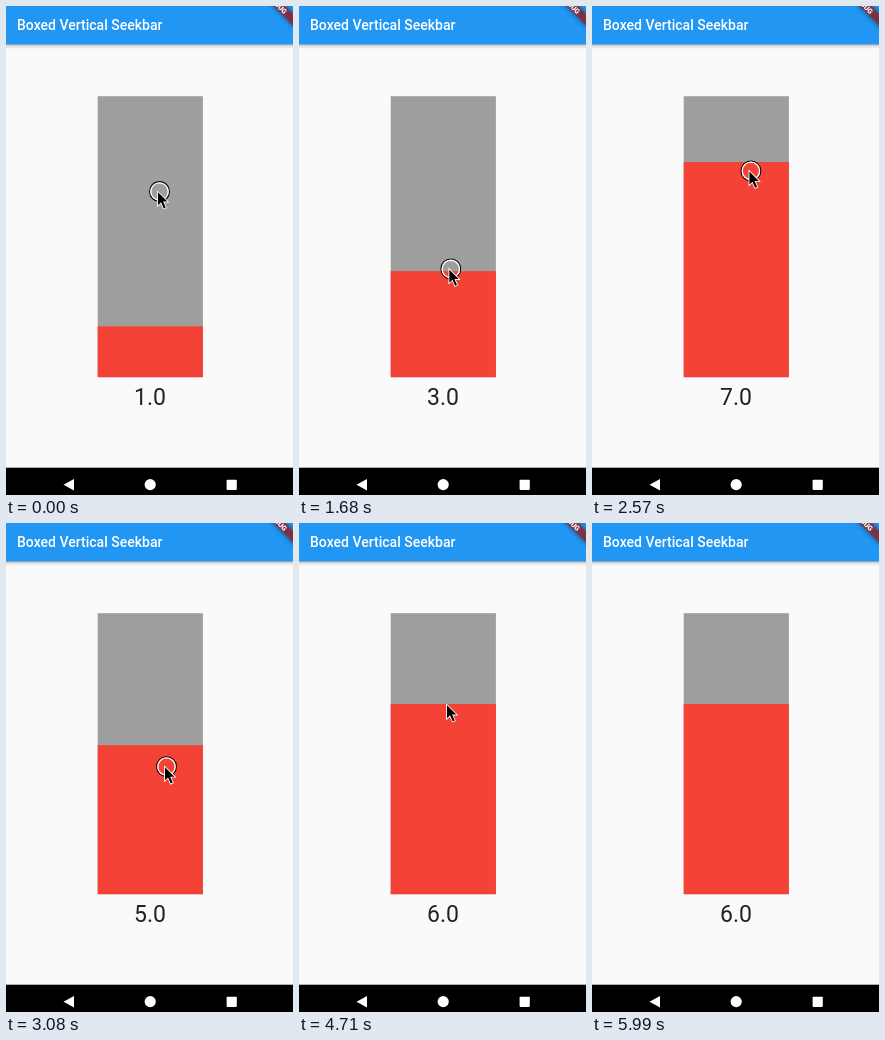
Recreate the animation shown at these times as an HTML page. Size 287 by 489 pixels, loop 6.49 s.

```html
<!DOCTYPE html>
<html lang="en">
<head>
<meta charset="utf-8">
<title>Boxed Vertical Seekbar</title>
<style>
  html, body { margin: 0; width: 100%; height: 100%; overflow: hidden; background: #fafafa; }
  svg { display: block; width: 287px; height: 489px; }
  text { font-family: Roboto, sans-serif; }
</style>
</head>
<body>
<svg viewBox="0 0 287 489">
  <defs>
    <linearGradient id="shade" x2="0" y2="1">
      <stop offset="0" stop-opacity=".32"/>
      <stop offset=".4" stop-opacity=".12"/>
      <stop offset="1" stop-opacity="0"/>
    </linearGradient>
    <filter id="blur" x="-50%" y="-200%" width="200%" height="500%">
      <feGaussianBlur stdDeviation="2.8"/>
    </filter>
  </defs>

  <rect width="287" height="489" fill="#fafafa"/>
  <rect y="38" width="287" height="5" fill="url(#shade)"/>
  <rect width="287" height="38.4" fill="#2196f3"/>
  <text x="11" y="24" font-size="14" font-weight="500" fill="#fff">Boxed Vertical Seekbar</text>

  <!-- corner ribbon -->
  <g transform="translate(288.6 -18.2) rotate(45)">
    <rect x="-28" y="19.5" width="56" height="8.4" opacity=".5" filter="url(#blur)"/>
    <rect x="-28" y="19.5" width="56" height="8.4" fill="#b71c1c" opacity=".627"/>
    <text y="26.3" font-size="7.1" font-weight="900" text-anchor="middle" fill="#fff">DEBUG</text>
  </g>

  <rect x="91.7" y="90.2" width="105.2" height="281" fill="#9e9e9e"/>
  <rect id="fill" x="91.7" width="105.2" fill="#f44336"/>
  <text id="value" x="144" y="398.5" font-size="23" text-anchor="middle" fill="#222"></text>

  <!-- navigation bar -->
  <rect y="461.7" width="287" height="28"/>
  <g fill="#fff">
    <path d="M57.5 478.7 68 473v11.4z"/>
    <circle cx="144.2" cy="478.6" r="5.6"/>
    <rect x="220.6" y="473.7" width="10.2" height="10.2" rx=".8"/>
  </g>

  <g id="pointer">
    <g id="ring" fill="none">
      <circle cx="2.5" cy="1.5" r="9.9" stroke="#000" stroke-width="1.1"/>
      <circle cx="2.5" cy="1.5" r="8.7" stroke="#fff" stroke-width="1.3"/>
    </g>
    <path d="M1 2.2v13l3.1-2.9 2.7 6.1 1.9-.9-2.6-5.9h4.3z" stroke="#fff" stroke-width="1.7" paint-order="stroke"/>
  </g>
</svg>
<script>
const LOOP = 6490, TOP = 90.2, BOTTOM = 371.2, TAP = 4680, RELEASE = 4710;
const [fill, value, pointer, ring] =
  ['fill', 'value', 'pointer', 'ring'].map(id => document.getElementById(id));

// Smooth curve through [time, ...values] keys; it rests at both ends and at turning points.
function curve(keys, axis = 1) {
  const rate = i => (keys[i + 1][axis] - keys[i][axis]) / (keys[i + 1][0] - keys[i][0]);
  const slope = i => {
    if (i === 0 || i === keys.length - 1) return 0;
    const a = rate(i - 1), b = rate(i);
    return a * b > 0 ? 2 * a * b / (a + b) : 0;
  };
  return t => {
    const i = Math.max(0, keys.findLastIndex((k, n) => k[0] <= t && n < keys.length - 1));
    const from = keys[i], to = keys[i + 1], span = to[0] - from[0];
    const u = Math.min(1, Math.max(0, (t - from[0]) / span)), w = 1 - u;
    return from[axis] * w * w * (1 + 2 * u) + to[axis] * u * u * (3 - 2 * u)
      + span * u * w * (slope(i) * w - slope(i + 1) * u);
  };
}

const path = [
  [250, 151, 184], [750, 147, 325],                                  // reach for the edge
  [1360, 147, 325], [2010, 153, 172], [2300, 155, 142],              // drag up
  [3080, 158, 242], [3780, 151, 304],                                // drag down
  [4060, 151, 304], [4470, 147, 180],                                // aim for the tap
  [5280, 147, 180], [5940, 237, 481],                                // leave
];
const pointerX = curve(path, 1), pointerY = curve(path, 2);
// The box edge trails the pointer while it is dragged.
const dragY = curve([[1370, 320.3], [2010, 180.8], [2340, 143], [3080, 222], [3780, 297]]);

const touching = t => t < 30 || (t >= 1110 && t < 3780) || (t >= TAP && t < RELEASE);
const show = (node, on) => node.setAttribute('display', on ? 'inline' : 'none');

function draw(t) {
  const y = t < RELEASE ? dragY(t) : 181;
  fill.setAttribute('y', y);
  fill.setAttribute('height', BOTTOM - y);
  value.textContent = Math.floor(10 * (BOTTOM - y) / (BOTTOM - TOP)).toFixed(1);
  pointer.setAttribute('transform', `translate(${pointerX(t)} ${pointerY(t)})`);
  show(pointer, t < 5990);
  show(ring, touching(t));
}

const origin = performance.now();
function tick() {
  draw((performance.now() - origin) % LOOP);
  requestAnimationFrame(tick);
}
tick();
</script>
</body>
</html>
```
